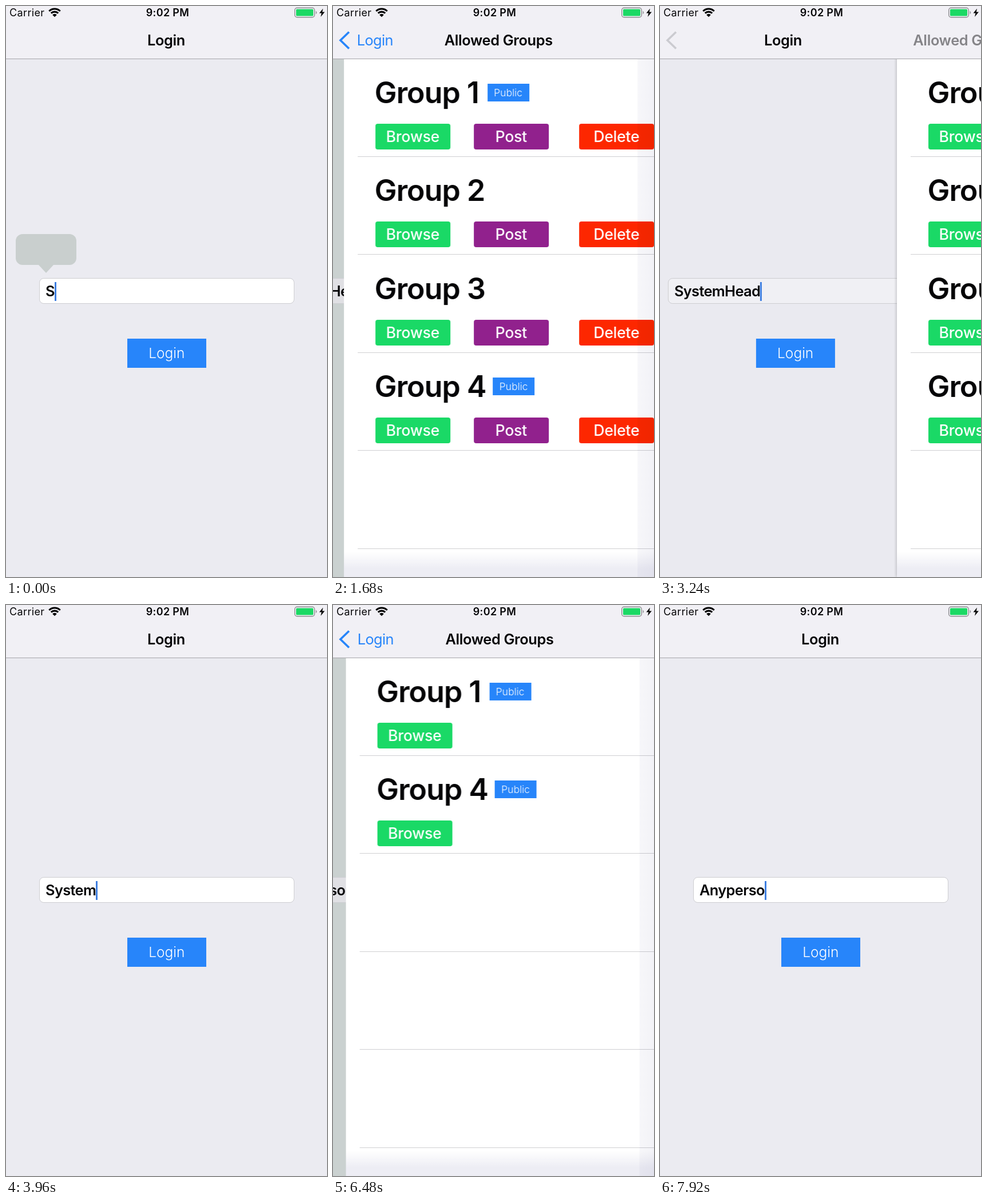
These frames come from a looping animation (561 by 999 pixels, 8000 ms). An HTML page:

```html
<!DOCTYPE html>
<html lang="en">
<head>
<meta charset="utf-8">
<title>Login and groups</title>
<style>
  html, body { margin: 0; width: 100%; height: 100%; overflow: hidden; background: #ebebf1; }
  #stage {
    position: relative; width: 561px; height: 999px; overflow: hidden;
    font-family: Inter, "Liberation Sans", sans-serif; color: #050507; white-space: nowrap;
  }
  #stage div, #stage svg { position: absolute; box-sizing: border-box; }
  .page { left: 0; top: 0; width: 561px; height: 999px; }
  #login { background: #ebebf1; }
  #dim { inset: 0; background: #c9d0cf; }
  #field {
    left: 58px; top: 476px; width: 446px; height: 45px; padding-left: 10px;
    border: 1px solid #cdcdd1; border-radius: 8px;
    font-size: 25.4px; font-weight: 600; letter-spacing: -.025em; line-height: 43px;
  }
  #caret { display: inline-block; width: 3px; height: 33px; background: #3f7fe0; vertical-align: middle; margin-top: -3px; }
  #enter {
    left: 211.5px; top: 582px; width: 138.5px; height: 51px; line-height: 51px;
    background: #2785fa; color: #fff; text-align: center; font-size: 24.5px; font-weight: 300;
  }
  #bubble { left: 17px; top: 399px; fill: #c9cfce; }
  .list { background: #fff; }
  .list::after {
    content: ""; position: absolute; inset: 0;
    background:
      linear-gradient(90deg, #fff 513px, #f7f7fa 513px, #efeff5 561px),
      linear-gradient(#fff 955px, #ededf4 985px);
    background-blend-mode: multiply;
    mix-blend-mode: multiply;
  }
  .row { left: 0; width: 561px; height: 172px; }
  .row::after { content: ""; position: absolute; left: 24px; right: -40px; bottom: 0; height: 1px; background: #cfcfd2; }
  .name { left: 53.5px; top: 28px; line-height: 64px; font-size: 52px; font-weight: 600; letter-spacing: -.02em; }
  .badge {
    top: 44px; width: 73px; height: 31px; line-height: 31px; background: #2785fa; color: #fff;
    text-align: center; font-size: 17.5px; font-weight: 300;
  }
  .btn {
    top: 114px; width: 131.5px; height: 45px; line-height: 45px; border-radius: 4px; color: #fff;
    text-align: center; font-size: 26.5px; font-weight: 500; letter-spacing: -.008em;
  }
  #bar { left: 0; top: 0; width: 561px; height: 93px; background: #f1f0f5; border-bottom: 1px solid #a5a5a9; overflow: hidden; }
  .nav { left: 0; top: 40px; line-height: 40px; font-size: 25.4px; letter-spacing: -.015em; font-weight: 600; }
  #back { font-weight: 400; letter-spacing: -.025em; }
  .status { top: 0; line-height: 24px; font-size: 18px; letter-spacing: .02em; }
</style>
</head>
<body>
<div id="stage">
  <div id="login" class="page">
    <div id="dim"></div>
    <div id="field"><span id="typed"></span><span id="caret"></span></div>
    <div id="enter">Login</div>
    <svg id="bubble" width="106" height="68">
      <rect width="106" height="54" rx="12"/>
      <path d="M39 53L53 68L67 53Z"/>
    </svg>
  </div>
  <div id="all" class="page list"></div>
  <div id="open" class="page list"></div>
  <div id="bar">
    <div id="title" class="nav">Login</div>
    <div id="back" class="nav">Login</div>
    <div id="groups" class="nav">Allowed Groups</div>
    <svg id="chevron" width="40" height="92" fill="none" stroke-width="3.6"><path d="M28 45.5L13 60L28 74.5"/></svg>
    <div class="status" style="left:6px">Carrier</div>
    <div class="status" style="left:0;width:565px;text-align:center;font-weight:600">9:02 PM</div>
    <svg width="561" height="24" style="left:0;top:0">
      <g fill="none" stroke="#000" stroke-width="3.1">
        <path d="M75.3 9A13.8 13.8 0 0 1 94.7 9"/>
        <path d="M78.8 12.7A8.8 8.8 0 0 1 91.2 12.7"/>
      </g>
      <path d="M85 19.3L81.2 15.4A5.4 5.4 0 0 1 88.8 15.4Z"/>
      <rect x="504.7" y="3.2" width="34.6" height="16.6" rx="4" fill="none" stroke="#8d8d91" stroke-width="1.4"/>
      <rect x="507" y="5.5" width="30" height="12" rx="1.5" fill="#1bd964"/>
      <path d="M541.5 8.5Q545 11.5 541.5 14.5Z" fill="#8d8d91"/>
      <path d="M554 4.5L547.5 12.5H551.5L550 19L557 10.5H552.8Z"/>
    </svg>
  </div>
</div>
<script>
const LOOP = 8000, STEP = 120, W = 561, OMEGA = 18 / 1000;
const ADMIN = "SystemHead", GUEST = "Anyperson";
const PUSHES = [1391, 6202], POPS = [3094, 7534.5];
const $ = id => document.getElementById(id);
const clamp = v => Math.max(0, Math.min(1, v));

function add(parent, cls, text, style) {
  const el = document.createElement("div");
  el.className = cls;
  el.textContent = text;
  Object.assign(el.style, style);
  parent.append(el);
  return el;
}

const BUTTONS = [["Browse", 54.5, "#1ad966"], ["Post", 226.5, "#91218d"], ["Delete", 410.5, "#fd2700"]];

function fillList(list, names, count) {
  for (let i = 0; i < 5; i++) {
    const row = add(list, "row", "", { top: Math.round(92 + i * 171.4) + "px" });
    const n = names[i];
    if (!n) continue;
    add(row, "name", "Group " + n, {});
    if (n === 1 || n === 4) add(row, "badge", "Public", { left: (n === 1 ? 250.5 : 260) + "px" });
    for (const [label, x, color] of BUTTONS.slice(0, count))
      add(row, "btn", label, { left: x + "px", background: color });
  }
}
fillList($("all"), [1, 2, 3, 4], 3);
fillList($("open"), [1, 4], 1);

// critically damped spring from 0 to 1
function spring(ms) {
  const s = Math.max(0, ms) * OMEGA;
  const v = 1 - (1 + s) * Math.exp(-s);
  return v > .99 ? 1 : v;
}

function typed(t) {
  if (t < 3480) return ADMIN.slice(0, 1 + Math.floor(t / 120));
  if (t < 5100) return ADMIN.slice(0, Math.max(0, 9 - Math.floor((t - 3480) / 150)));
  if (t < 7900) return GUEST.slice(0, 1 + Math.floor((t - 5100) / 105));
  return GUEST.slice(0, -1);
}

function place(el, x, opacity) {
  el.style.transform = `translateX(${x}px)`;
  el.style.opacity = opacity;
}

function render(t) {
  const second = t > 4500 ? 1 : 0;
  const popping = t >= POPS[second];
  // p: 1 shows the login page, 0 shows the list
  const p = popping ? spring(t - POPS[second]) : 1 - spring(t - PUSHES[second]);
  const moving = p < 1;

  $("typed").textContent = typed(t);
  $("bubble").style.display = t < 120 ? "" : "none";
  $("login").style.transform = `translateX(${-.3 * W * (1 - p)}px)`;
  const dim = clamp(1 - p * 1.3);
  $("dim").style.opacity = dim;
  const shade = 241 - 18 * dim;
  $("field").style.background = moving ? `rgb(${shade},${shade},${shade + 4})` : "#fff";

  ["all", "open"].forEach((id, i) => {
    const el = $(id);
    el.style.display = moving && i === second ? "" : "none";
    el.style.transform = `translateX(${p * W}px)`;
    el.style.boxShadow = popping ? "-1px 0 5px rgba(0,0,0,.22)" : "none";
  });

  const x = 37 + 150 * p + 61 * p ** 1.8;
  const tint = popping ? "#cbcbd0" : "#2785fa";
  place($("title"), x - 1, clamp((p - .2) * 2.5));
  place($("back"), x - .5, clamp(1.3 - p * 3));
  place($("groups"), 185 + 280 * p + 93 * p * p, 1 - p * p);
  $("back").style.color = tint;
  $("chevron").style.stroke = tint;
  $("chevron").style.opacity = clamp((1 - p) * 4);
}

// the picture is held for each step; a small lead absorbs clock jitter
const start = performance.now();
function tick() {
  const t = (performance.now() - start + 8) % LOOP;
  render(Math.floor(t / STEP) * STEP);
  requestAnimationFrame(tick);
}
render(0);
requestAnimationFrame(tick);
</script>
</body>
</html>
```
